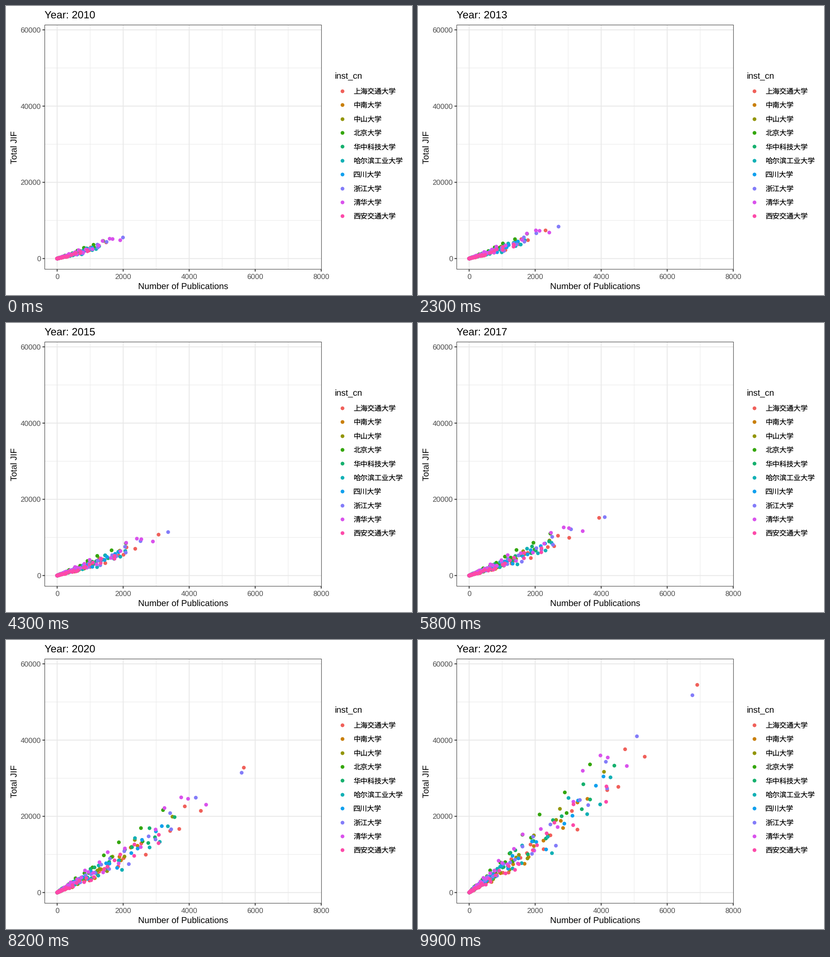
Write a matplotlib script that moves like this. It is 885 px wide and 632 px high and loops after 10 s.

```python
import numpy as np
import matplotlib.pyplot as plt
from matplotlib.animation import FuncAnimation
from matplotlib.patches import Rectangle

W, H, DPI = 885, 632, 100
FRAMES = 100
LEFT, RIGHT, TOP, BOTTOM = 84.5, 687.7, 41.5, 575.7
SANS, CJK = "Liberation Sans", "Noto Sans CJK JP"
GRID, DARK, GREY = "#e8e8e8", "#333333", "#4d4d4d"
FIELDS = 52

# Key years with the share of growth reached and the relative impact per paper
YEARS = [2010, 2015, 2017, 2019, 2020, 2021, 2022]
GROWTH = np.array([0, 0.25, 0.41, 0.57, 0.71, 1.03])
IMPACT = [0.38, 0.46, 0.51, 0.64, 0.78, 1.02, 1.05]

# name, colour, size in 2010 and 2022 relative to 2021,
# the four leading fields of 2021 as (papers, total JIF)
SCHOOLS = [
    ("上海交通大学", "#f0605a", 0.20, 0.93,
     [(7430, 55800), (5720, 36500), (5080, 38500), (4860, 28400)]),
    ("中南大学", "#c97f0a", 0.20, 1.12,
     [(3200, 20900), (2930, 20100), (2540, 14400), (2480, 16000)]),
    ("中山大学", "#929508", 0.20, 0.89,
     [(4590, 33900), (3090, 23500), (2960, 20400), (2680, 16100)]),
    ("北京大学", "#34a60c", 0.35, 0.92,
     [(3980, 34800), (3150, 27200), (3210, 21600), (2320, 21200)]),
    ("华中科技大学", "#16b06e", 0.17, 0.93,
     [(4730, 34100), (3940, 25000), (3720, 29100), (3670, 22400)]),
    ("哈尔滨工业大学", "#12b0b5", 0.30, 1.01,
     [(4240, 28500), (3930, 21800), (3540, 19400), (2980, 23400)]),
    ("四川大学", "#10a0ee", 0.26, 1.00,
     [(4070, 29000), (3840, 26700), (3300, 23000), (3130, 19200)]),
    ("浙江大学", "#837cf9", 0.28, 0.95,
     [(7120, 51900), (5350, 41100), (4360, 34400), (4400, 27400)]),
    ("清华大学", "#d952ec", 0.34, 0.85,
     [(5620, 37200), (4940, 39700), (4680, 40300), (4050, 35800)]),
    ("西安交通大学", "#fd49a9", 0.23, 1.04,
     [(4000, 25500), (3990, 21800), (3040, 21200), (3030, 16200)]),
]

plt.rcParams.update({"path.snap": False, "text.hinting": "none",
                     "text.hinting_factor": 1})
rng = np.random.default_rng(10)


def px(v):
    return 111.5 + 0.07195 * v


def py(v):
    return 552.3 - 0.008335 * v


def fields(leaders):
    """Sizes and JIF per paper: the leaders, then a geometric tail."""
    papers, jif = np.array(leaders, float).T
    ratio = jif / papers
    rest = np.arange(1, FIELDS - len(papers) + 1)
    tail = papers.min() * 0.87 ** rest * rng.uniform(0.93, 1.07, rest.size)
    noise = np.exp(np.clip(rng.normal(0, 0.16, rest.size), -0.35, 0.38))
    return np.append(papers, tail), np.append(ratio, 0.87 * ratio.mean() * noise)


def growth(year, start, last):
    curve = np.append(start + (1 - start) * GROWTH, last)
    return np.interp(year, YEARS, curve)


sizes, ratios = np.transpose([fields(s[4]) for s in SCHOOLS], (1, 0, 2))


def points(year):
    scale = [growth(year, start, last) for _, _, start, last, _ in SCHOOLS]
    papers = sizes * np.array(scale)[:, None]
    jif = papers * ratios * np.interp(year, YEARS, IMPACT)
    return np.column_stack([px(papers.ravel()), py(jif.ravel())])


fig = plt.figure(figsize=(W / DPI, H / DPI), dpi=DPI, facecolor="white")
ax = fig.add_axes([0, 0, 1, 1])
ax.set_xlim(0, W)
ax.set_ylim(H, 0)
ax.axis("off")


def pt(pixels):
    return pixels * 72 / DPI


def label(x, y, s, size, color="black", font=SANS, **kw):
    return ax.text(x, y, s, fontsize=pt(size), color=color, family=font,
                   va="baseline", **kw)


def line(xs, ys, color, width, z):
    ax.plot(xs, ys, color=color, lw=pt(width), zorder=z, solid_capstyle="butt")


def dots(xy, colors):
    return ax.scatter(*np.transpose(xy), s=pt(8.2) ** 2, c=colors,
                      linewidths=0, zorder=2)


for i in range(8):
    width = 0.95 if i % 2 else 1.9
    x = px(1000 * i)
    line([x, x], [TOP, BOTTOM], GRID, width, 1)
    if i < 7:
        y = py(10000 * i)
        line([LEFT, RIGHT], [y, y], GRID, width, 1)

for v in range(0, 8001, 2000):
    x = px(v)
    line([x, x], [BOTTOM, BOTTOM + 5], DARK, 1.9, 4)
    label(x, 596.8, str(v), 15.5, GREY, ha="center")
for v in range(0, 60001, 20000):
    y = py(v)
    line([LEFT - 5, LEFT], [y, y], DARK, 1.9, 4)
    label(75.8, y + 5.6, str(v), 15.5, GREY, ha="right")

ax.add_patch(Rectangle((LEFT, TOP), RIGHT - LEFT, BOTTOM - TOP, fill=False,
                       ec=DARK, lw=pt(1), zorder=3))

title = label(84, 27, "", 23.2)
label(386, 619, "Number of Publications", 19.3, ha="center")
label(24, 309, "Total JIF", 19.3, rotation=90, rotation_mode="anchor",
      ha="center")
label(717, 159.3, "inst_cn", 19.3)
for i, (name, color, *_) in enumerate(SCHOOLS):
    y = 186 + 30.37 * i
    dots([(732.6, y)], [color])
    label(757.2, y + 5.8, name, 15.4, font=CJK)

cloud = dots(points(2010), np.repeat([s[1] for s in SCHOOLS], FIELDS))


def draw(frame):
    year = 2010 + 12 * frame / (FRAMES - 1)
    cloud.set_offsets(points(year))
    title.set_text(f"Year: {round(year)}")
    return cloud, title


anim = FuncAnimation(fig, draw, frames=FRAMES, interval=100, repeat=True,
                     repeat_delay=0)
plt.show()
```
